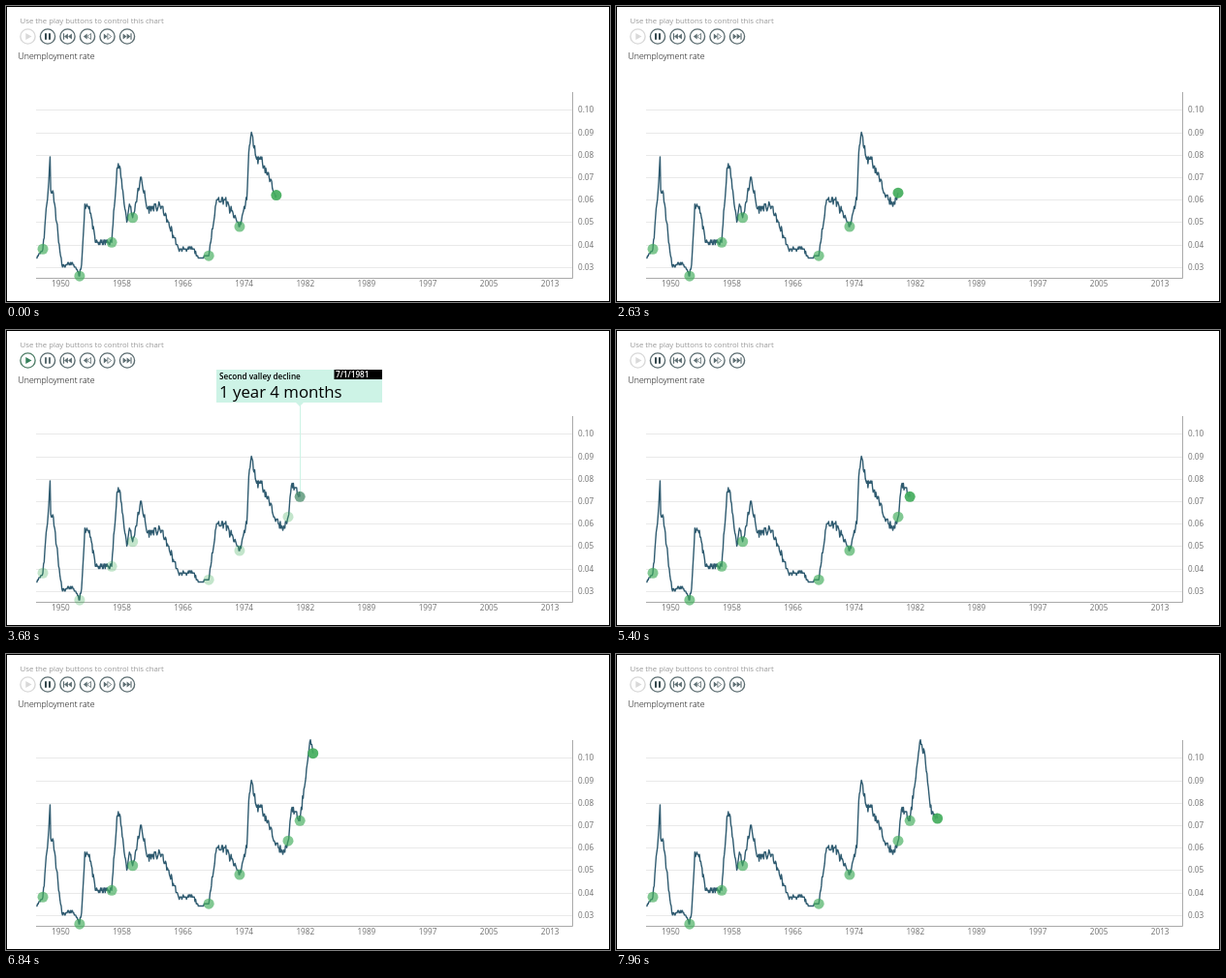
An HTML page that plays this animation: 623x306 px, repeating every 8000 ms.

```html
<!DOCTYPE html>
<html lang="en">
<head>
<meta charset="utf-8">
<title>Unemployment rate</title>
<style>
  html, body { margin: 0; width: 100%; height: 100%; overflow: hidden; background: #fff; }
  svg { display: block; width: 623px; height: 306px; font: 8.2px "Open Sans", "Noto Sans", sans-serif; }
  .axis { fill: none; stroke: #aaa; }
  .grid { stroke: #e9e9e9; }
  .label { fill: #707070; }
  .line { fill: none; stroke: #2f5b70; stroke-width: 1.4; stroke-linejoin: round; }
  .btn circle { fill: none; stroke: #5d6e72; stroke-width: 1.4; }
  .btn path { fill: #5d6e72; }
  .btn .hollow { fill: none; stroke: #5d6e72; stroke-width: .8; }
  .playing .play circle { stroke: #d9d9d9; }
  .playing .play path { fill: #d9d9d9; }
  .paused .play circle { stroke: #52806a; }
  .paused .play path { fill: #35805a; }
  .playing .pause path { fill: #36494e; }
  .event { fill: #43ad5c; fill-opacity: .67; }
  .head { fill: #43ad5c; fill-opacity: .92; }
  .paused .event { fill-opacity: .32; }
  .paused .head { fill: #4f8f6f; fill-opacity: .78; }
  .playing .tip { display: none; }
  .bold { font-weight: 600; }
</style>
</head>
<body>
<svg id="stage" viewBox="0 0 623 306" class="playing">
  <rect x=".5" y=".5" width="622" height="305" fill="#fff" stroke="#000"/>
  <text x="14.5" y="18" font-size="7.8" fill="#999">Use the play buttons to control this chart</text>
  <text x="12.5" y="55" font-size="8.8" font-weight="300">Unemployment rate</text>
  <g id="buttons"></g>
  <g id="grid" class="grid"></g>
  <path class="axis" d="M31 281.5H584.5V89"/>
  <g id="labels" class="label"></g>
  <line id="guide" class="tip" y1="78" stroke="#cdf3e6"/>
  <polyline id="line" class="line"/>
  <g id="events"></g>
  <circle id="head" class="head" r="5.5"/>
  <g id="tip" class="tip">
    <path d="M-86 41H85V75H4L0 79L-4 75H-86Z" fill="#cdf3e6"/>
    <rect x="35.5" y="41" width="49.5" height="10"/>
    <text id="date" class="bold" x="37" y="49.3" fill="#fff"></text>
    <text id="name" class="bold" x="-83" y="51"></text>
    <text id="span" x="-83" y="70" font-size="16.8"></text>
  </g>
</svg>
<script>
const LOOP = 8000;
const $ = id => document.getElementById(id);
const px = month => 31.26 + month * 0.6764;
const py = rate => 107.3 + (100 - rate) * 2.322;

function set(el, attrs) {
  for (const key in attrs) el.setAttribute(key, attrs[key]);
  return el;
}

function add(parent, tag, attrs, text = '') {
  const el = set(document.createElementNS('http://www.w3.org/2000/svg', tag), attrs);
  el.textContent = text;
  return parent.appendChild(el);
}

// Straight line through [position, value] pairs
function follow(pairs, at) {
  const i = Math.max(1, pairs.findIndex(p => p[0] >= at));
  const [x0, y0] = pairs[i - 1], [x1, y1] = pairs[i];
  return y0 + (y1 - y0) * (at - x0) / (x1 - x0);
}

// Turning points: month since January 1948, rate in tenths of a percent
const turns = [
  [0, 34], [10, 38], [19, 68], [21, 79], [22, 64], [26, 63], [36, 37], [40, 30], [55, 32],
  [66, 26], [69, 31], [74, 58], [81, 57], [90, 41], [115, 41], [123, 74], [127, 75], [138, 50],
  [142, 58], [147, 52], [160, 70], [169, 56], [191, 57], [217, 38], [239, 38], [248, 34],
  [263, 35], [275, 60], [287, 60], [310, 48], [321, 60], [324, 81], [328, 90], [336, 78],
  [343, 78], [366, 62], [376, 57], [384, 63], [390, 78], [402, 72], [418, 108], [425, 101],
  [433, 78], [444, 73]
];

// Months between turning points wobble, more so the further the rate is from its calm level
let seed = 11;
const random = () => (seed = (seed * 16807) % 2147483647) / 2147483647;
const rates = Array.from({ length: 445 }, (_, m) => {
  const rate = follow(turns, m);
  const rough = turns.some(p => p[0] === m) ? 0 : Math.min(1.8, Math.abs(rate - 34) / 5);
  return Math.round(rate + (random() * 2 - 1) * rough);
});
const points = rates.map((r, m) => px(m).toFixed(2) + ',' + py(r).toFixed(2));

// Time in ms and the month reached
const pace = [
  [0, 366], [840, 384], [2630, 384], [3610, 402], [5400, 402],
  [6170, 416], [6440, 418], [6640, 419], [7960, 444], [LOOP, 444]
];
const stops = [
  { from: 910, to: 2630, date: '1/1/1980', name: 'Valley decline', span: '6 months' },
  { from: 3680, to: 5400, date: '7/1/1981', name: 'Second valley decline', span: '1 year 4 months' }
];

const back = x => `M${x} -3V3L${x - 3.8} 0Z`;
const fore = x => `M${x} -3V3L${x + 3.8} 0Z`;
const bar = (x, w) => `M${x} -3.2h${w}v6.4h${-w}Z`;
const icons = [
  ['play', 'M-2.2 -3.6V3.6L4 0Z'],
  ['pause', bar(-3, 2) + bar(1, 2)],
  ['first', bar(-4.6, 1.2) + back(.4) + back(4.4)],
  ['rewind', back(-.3), back(3.5)],
  ['forward', fore(-3.7), fore(.3)],
  ['last', fore(-4.4) + fore(-.4) + bar(3.4, 1.2)]
];
icons.forEach(([name, d, hollow], i) => {
  const btn = add($('buttons'), 'g', { class: 'btn ' + name, transform: `translate(${22.5 + i * 20.5} 31.5)` });
  add(btn, 'circle', { r: 7.6 });
  add(btn, 'path', { d });
  if (hollow) add(btn, 'path', { class: 'hollow', d: hollow });
});

for (let rate = 30; rate <= 100; rate += 10) {
  const y = Math.round(py(rate)) + .5;
  add($('grid'), 'line', { x1: 31, x2: 584, y1: y, y2: y });
  add($('labels'), 'text', { x: 590, y: y + 2.5 }, (rate / 1000).toFixed(2));
}
for (let i = 0; i < 9; i++) {
  add($('labels'), 'text', { x: 56.4 + i * 63.1, y: 290, 'text-anchor': 'middle' }, Math.round(1950 + i * 7.875));
}

const events = [10, 66, 115, 147, 263, 310, 384, 402].map(month => ({
  month,
  el: add($('events'), 'circle', { class: 'event', r: 5.5, cx: px(month), cy: py(rates[month]) })
}));

function draw(t) {
  const month = Math.floor(follow(pace, t));
  const x = px(month), y = py(rates[month]);
  const stop = stops.find(s => t >= s.from && t < s.to);
  set($('stage'), { class: stop ? 'paused' : 'playing' });
  set($('line'), { points: points.slice(0, month + 1).join(' ') });
  set($('head'), { cx: x, cy: y });
  for (const e of events) e.el.style.display = e.month < month ? '' : 'none';
  if (!stop) return;
  const mid = Math.round(x);
  set($('tip'), { transform: `translate(${mid} 0)` });
  set($('guide'), { x1: mid + .5, x2: mid + .5, y2: y });
  for (const id of ['date', 'name', 'span']) $(id).textContent = stop[id];
}

const start = performance.now();
function tick() {
  draw((performance.now() - start) % LOOP);
  requestAnimationFrame(tick);
}
tick();
</script>
</body>
</html>
```
